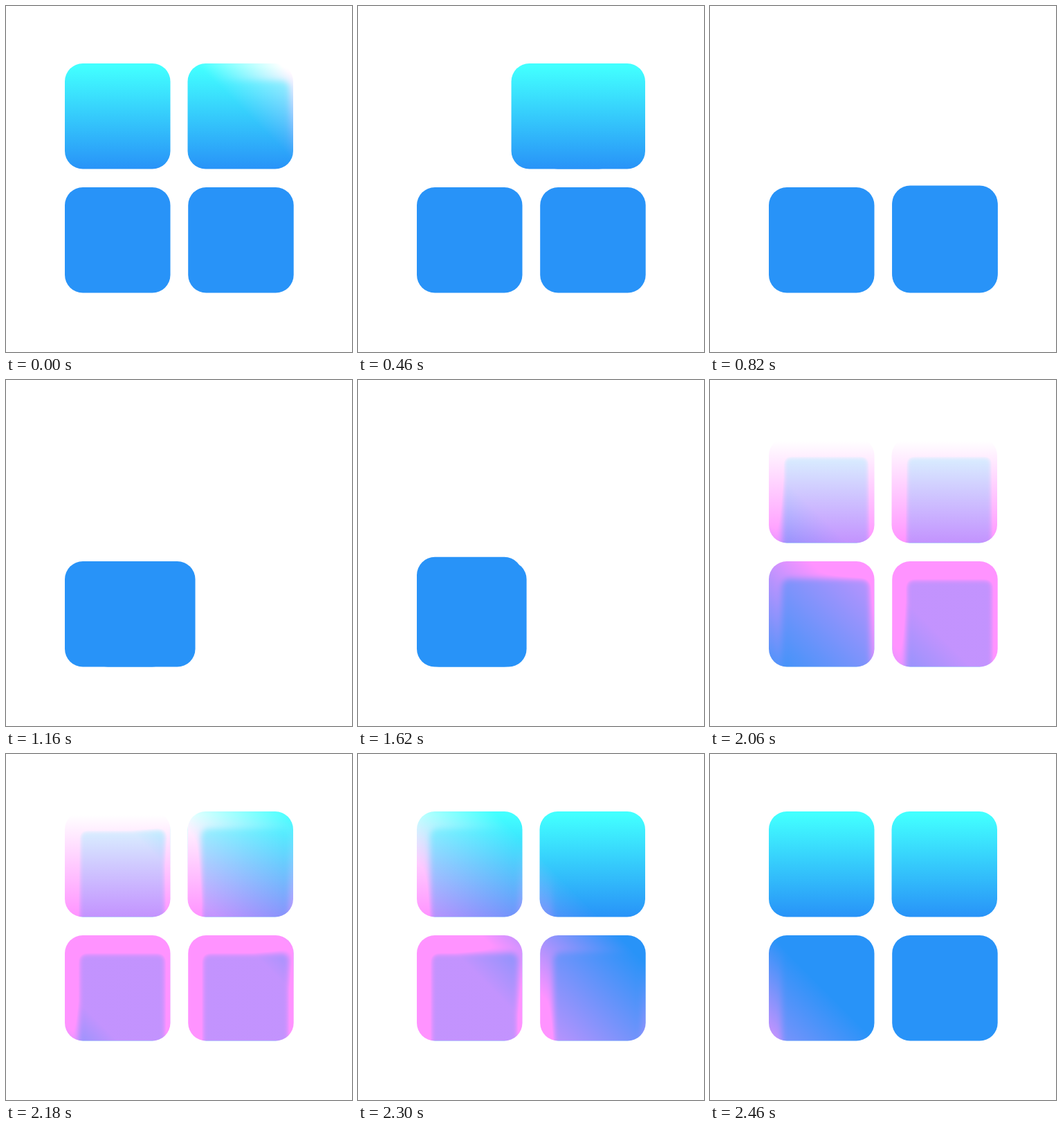
An HTML page with a canvas for the animation above (2.48 s loop, 500 by 500 pixels).

```html
<!DOCTYPE html>
<html>
<head>
<meta charset="utf-8">
<style>
html, body { margin: 0; width: 100%; height: 100%; overflow: hidden; background: #fff; }
canvas { display: block; }
</style>
</head>
<body>
<canvas id="stage" width="500" height="500"></canvas>
<script>
const ctx = document.getElementById('stage').getContext('2d');
const LOOP = 2480, STEP = 20, SIZE = 152.5, RADIUS = 26;
const TL = [85, 83], TR = [262.5, 83], BL = [85, 262], BR = [263.2, 262];

const ease = (t, start, end) => {
  const u = Math.min(1, Math.max(0, (t - start) / (end - start)));
  return u * u * (3 - 2 * u);
};
const mix = (a, b, u) => a.map((v, i) => v + (b[i] - v) * u);

const base = ctx.createLinearGradient(0, 88, 0, 235);
base.addColorStop(0, '#42ffff');
base.addColorStop(1, '#2893f8');

// Tiles merge clockwise one after the other, then spread out together.
function tilesAt(t) {
  if (t >= 1580) {
    const out = ease(t, 1590, 1860);
    return [BL, mix(BL, TL, out), mix(BL, BR, out), mix(BL, TR, ease(t, 1605, 1860))];
  }
  const tiles = [BL];
  const move = (from, to, start, end) => {
    const u = ease(t, start, end);
    if (u < 1) tiles.push(mix(from, to, u));
  };
  move(BR, BL, 840, 1290);
  move(TR, BR, 550, 840);
  move(TL, TR, 250, 555);
  return tiles;
}

function tilePath([x, y]) {
  ctx.beginPath();
  ctx.roundRect(x, y, SIZE, SIZE, RADIUS);
}

// Diagonal light band; distances run from the top right to the bottom left.
function band(tail, tailEnd, frontStart, front) {
  const far = 1600, from = -800;
  const at = d => [416 - d / 2, 83 + d / 2];
  const g = ctx.createLinearGradient(...at(from), ...at(from + far));
  const stop = (d, a) =>
    g.addColorStop(Math.min(1, Math.max(0, (d - from) / far)), `rgba(215,0,8,${a})`);
  stop(tail, 0);
  stop(tailEnd, 1);
  stop(frontStart, 1);
  stop(front, 0);
  return g;
}

function shineAt(t) {
  if (t < 260) return band(-700, -500, -40, 140);
  if (t < 1660) return null;
  const tail = 220 + 1.8 * (t - 2300);
  const front = 700 + 1.8 * (t - 2060);
  return band(tail, tail + 260, front - 330, front);
}

function shine(tile, light) {
  const [x, y] = tile;
  ctx.save();
  tilePath(tile);
  ctx.clip();
  ctx.globalCompositeOperation = 'lighter';
  ctx.fillStyle = light;
  ctx.globalAlpha = 0.72;
  ctx.fillRect(x, y, SIZE, SIZE);
  // Brighter soft rim along the top and the sides
  ctx.globalAlpha = 0.6;
  ctx.filter = 'blur(4px)';
  ctx.beginPath();
  ctx.rect(x - 30, y - 30, SIZE + 60, SIZE + 60);
  ctx.roundRect(x + 19, y + 25, 128, 190, 11);
  ctx.fill('evenodd');
  ctx.restore();
}

function draw(now) {
  const t = Math.floor((now % LOOP) / STEP) * STEP;
  const tiles = tilesAt(t), light = shineAt(t);
  ctx.fillStyle = '#fff';
  ctx.fillRect(0, 0, 500, 500);
  ctx.fillStyle = base;
  for (const tile of tiles) {
    tilePath(tile);
    ctx.fill();
  }
  if (light) tiles.forEach(tile => shine(tile, light));
}

let begin;
function frame(now) {
  begin ??= now;
  draw(now - begin);
  requestAnimationFrame(frame);
}
draw(0);
requestAnimationFrame(frame);
</script>
</body>
</html>
```
